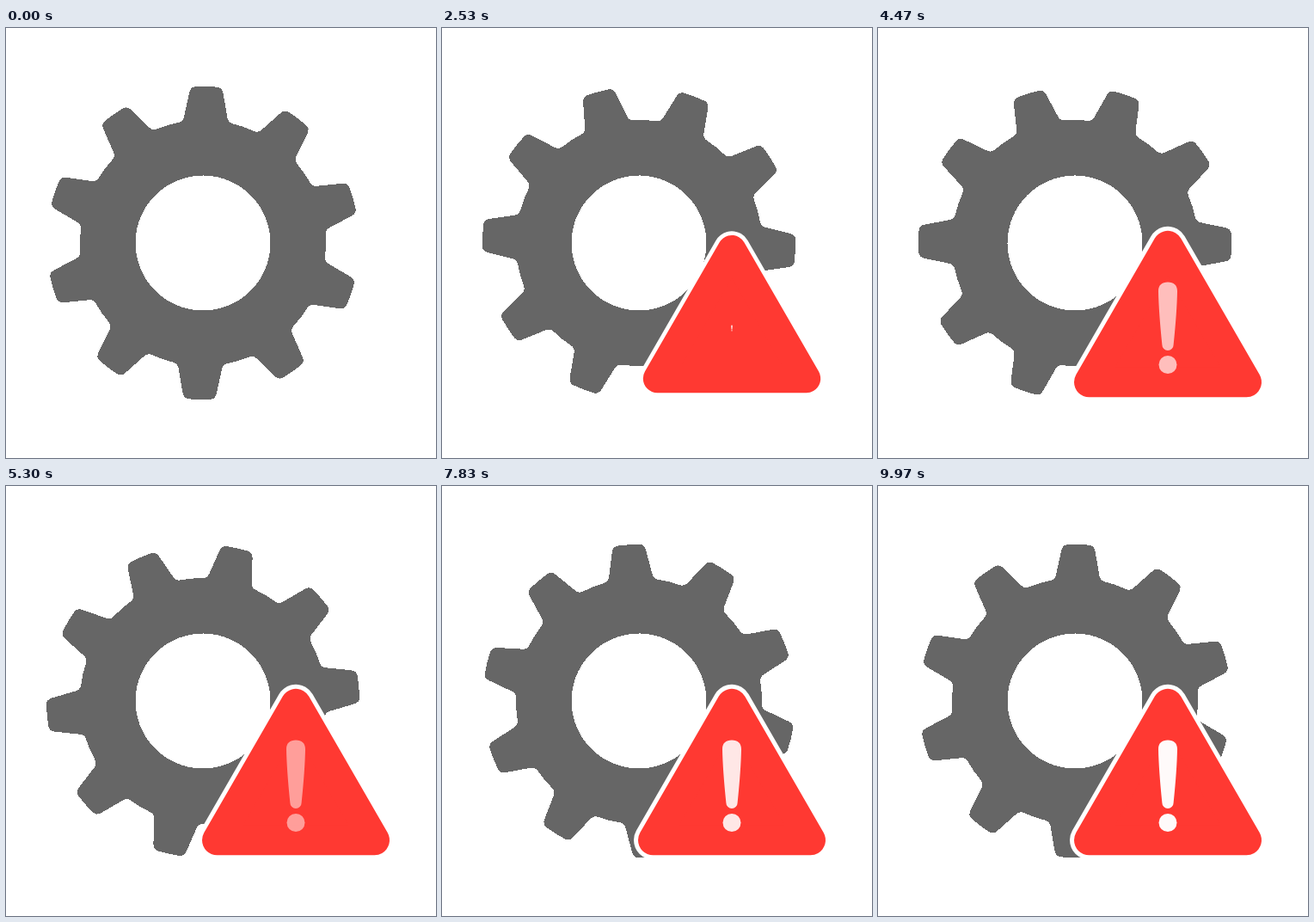
Recreate the animation shown at these times as an HTML page. Size 500 by 500 pixels, loop 10 s.

```html
<!DOCTYPE html>
<html lang="en">
<head>
<meta charset="utf-8">
<title>Gear warning</title>
<style>
  html, body { margin: 0; width: 100%; height: 100%; overflow: hidden; background: #fff; }
  svg { display: block; width: 100vw; height: 100vh; }
</style>
</head>
<body>
<svg viewBox="0 0 500 500">
  <path id="gear" fill="#666" fill-rule="evenodd" shape-rendering="crispEdges"/>
  <g id="sign" stroke-linejoin="round">
    <path d="M337 253.3L428.5 411.8H245.5Z" fill="#fff" stroke="#fff" stroke-width="45"/>
    <path d="M337 253.3L428.5 411.8H245.5Z" fill="#ff3932" stroke="#ff3932" stroke-width="35"/>
  </g>
  <g id="mark" fill="#fff">
    <path d="M326 306C326 299 330 295.5 337 295.5S348 299 348 306Q347.6 330 343.6 368.5A6.6 6.4 0 0 1 330.4 368.5Q326.4 330 326 306Z"/>
    <circle cx="337" cy="391.5" r="10.5"/>
  </g>
</svg>
<script>
const FRAMES = 300, LOOP = 10000, TEETH = 10;
const [gear, sign, mark] = ['gear', 'sign', 'mark'].map(id => document.getElementById(id));

// One tooth outline, left half, as [x, y] around the gear centre with the tip up.
const half = [[-31, -139.6], [-26.3, -141], [-25.3, -146], [-19.6, -175], [-18.3, -181], [-13, -181.6]];
const outline = [...half, ...half.map(([x, y]) => [-x, y]).reverse()];

function gearPath() {
  let d = '';
  for (let k = 0; k < TEETH; k++) {
    const a = k * 2 * Math.PI / TEETH, c = Math.cos(a), s = Math.sin(a);
    const p = outline.map(([x, y]) => `${(x * c - y * s).toFixed(2)} ${(x * s + y * c).toFixed(2)}`);
    d += (k ? 'A143 143 0 0 1 ' : 'M') + p[0];
    d += `Q${p[1]} ${p[2]}L${p[3]}Q${p[4]} ${p[5]}A182 182 0 0 1 ${p[6]}`;
    d += `Q${p[7]} ${p[8]}L${p[9]}Q${p[10]} ${p[11]}`;
  }
  return d + 'A143 143 0 0 1 -31 -139.6Z' +
    'M78.5 0A78.5 78.5 0 1 0 -78.5 0A78.5 78.5 0 1 0 78.5 0Z';
}

const ramp = (f, from, to) => Math.min(1, Math.max(0, (f - from) / (to - from)));

function scaleAt(el, x, y, k) {
  el.style.display = k > 0 ? '' : 'none';
  el.setAttribute('transform', `translate(${x} ${y}) scale(${k}) translate(${-x} ${-y})`);
}

function pulse(f) {
  if (f < 120) return 1;
  const p = f % 60;
  return 1 - 0.7 * Math.min(p, 60 - p) / 30;
}

function draw(ms) {
  // 30 pictures a second, each starting on a whole hundredth
  const f = Math.floor((Math.floor(ms % LOOP / 10) * 3 + 1) / 10);
  gear.setAttribute('transform', `translate(229 250) rotate(${1.26 + 360 * f / (FRAMES - 1)})`);
  scaleAt(sign, 337, 333, ramp(f, 60, 76.9));
  scaleAt(mark, 337, 349, ramp(f, 75, 90));
  mark.setAttribute('opacity', pulse(f));
}

gear.setAttribute('d', gearPath());
const start = performance.now();
function tick() {
  draw(performance.now() - start);
  requestAnimationFrame(tick);
}
tick();
</script>
</body>
</html>
```
